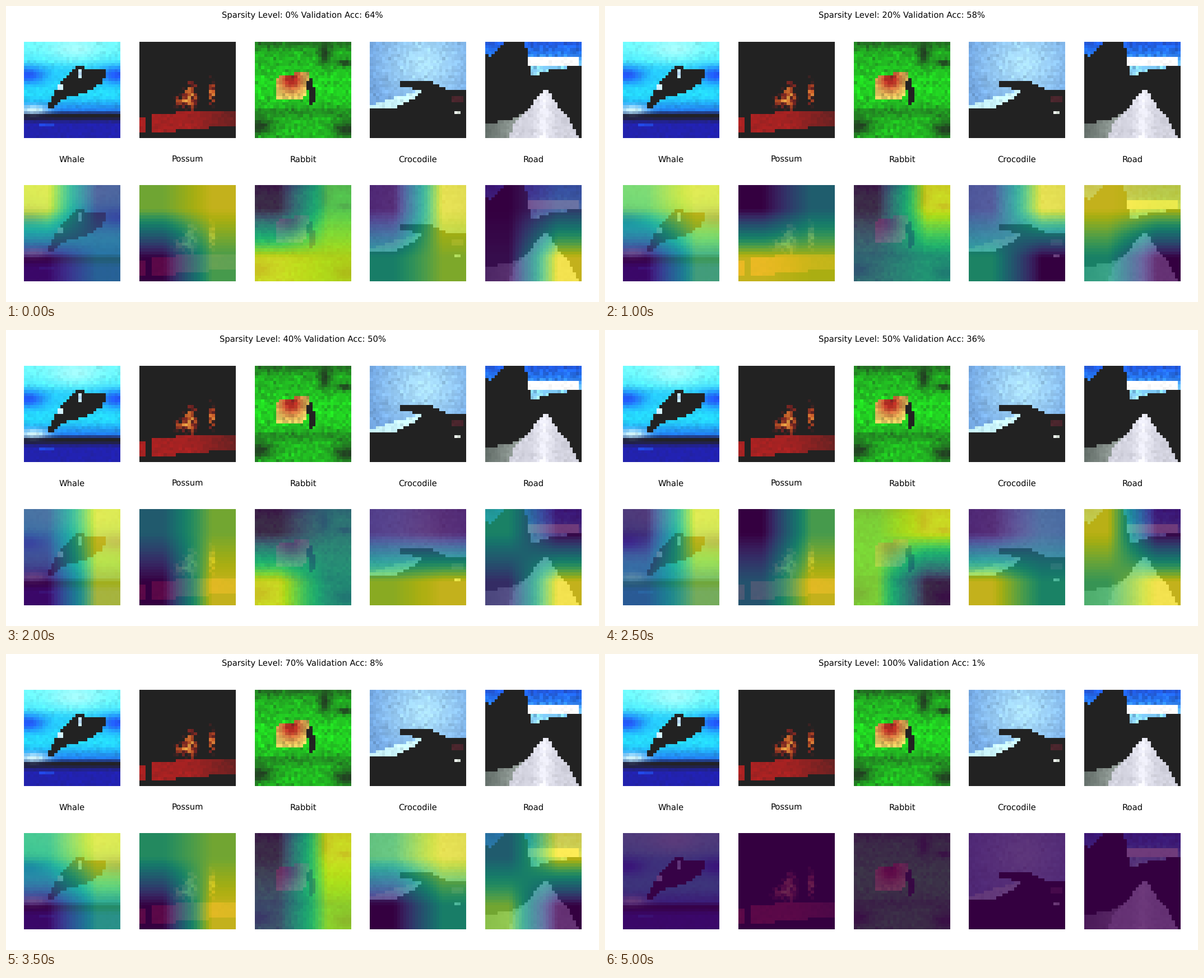
These frames come from a looping animation (1058x529 px, 5500 ms). A matplotlib script:

```python
import numpy as np
import matplotlib.pyplot as plt
from matplotlib.animation import FuncAnimation
from matplotlib.path import Path

W, H, DPI = 1058, 529, 100
N, SIDE = 32, 172
LEFTS = [32 + round(205.75 * i) for i in range(5)]
PHOTO_TOP, MAP_TOP = 64, 320
BLACK = (0, 0, 0)

plt.rcParams["font.family"] = "DejaVu Sans"
plt.rcParams["text.hinting"] = "no_hinting"

YY, XX = np.mgrid[:N, :N] + 0.5
CELLS = np.column_stack([XX.ravel(), YY.ravel()])


def ramp(field, at, *colors):
    """Map a scalar field to colours given at a few values."""
    return np.stack([np.interp(field, at, c) for c in zip(*colors)], axis=-1)


def poly(img, points, color):
    mask = Path(points).contains_points(CELLS).reshape(N, N)
    img[mask] = color[mask] if np.ndim(color) == 3 else color


def rect(img, x0, x1, y0, y1, color):
    img[y0:y1, x0:x1] = color


def bump(x, y, rx, ry):
    return np.exp(-((XX - x) / rx) ** 2 - ((YY - y) / ry) ** 2)


def glow(img, x, y, rx, ry, color):
    img += bump(x, y, rx, ry)[..., None] * (np.array(color) - img)


def grain(img, amount, seed):
    noise = np.random.default_rng(seed).normal(0, amount, (N, N, 1))
    return np.clip(img * (1 + noise), 0, 255)


def whale():
    img = ramp(YY, [2, 6, 9, 18, 23, 24, 25, 27],
               (110, 250, 255), (80, 240, 255), (40, 210, 255), (38, 220, 255),
               (30, 120, 240), (8, 8, 40), (8, 8, 40), (28, 28, 175))
    glow(img, 17, 2, 8, 4, (165, 255, 255))
    for x in (1, 31):
        glow(img, x, 11, 6, 2.8, (25, 85, 250))
    glow(img, 3, 22.5, 5, 1.5, (215, 250, 255))
    poly(img, [(17, 8), (22, 9), (27.3, 8.6), (26, 13.5), (20, 17), (12, 19),
               (9, 22), (8, 21.8), (10, 16.5), (13, 12.5)], (8, 8, 25))
    rect(img, 18, 19, 9, 12, (190, 225, 255))
    rect(img, 11, 13, 14, 16, (205, 235, 255))
    rect(img, 5, 10, 27, 28, (30, 70, 225))
    return grain(img, 0.03, 1)


def possum():
    rng = np.random.default_rng(4)
    flame = bump(17, 18, 2.6, 5) + bump(24, 16.5, 1.3, 5) + 0.7 * bump(13, 20, 3, 2)
    flame *= rng.uniform(0.35, 1, (N, N))
    img = ramp(flame, [0.2, 0.4, 0.65, 0.9],
               BLACK, (120, 38, 28), (195, 90, 40), (230, 165, 70))
    red = ramp(XX, [0, 18, 32], (170, 32, 32), (160, 32, 32), (105, 32, 32))
    poly(img, [(0, 24.7), (12, 23.5), (32, 23), (32, 27.6), (12, 29.5), (0, 30)], red)
    rect(img, 2, 4, 24, 31, BLACK)
    return grain(img, 0.04, 2)


def rabbit():
    img = ramp(YY, [0, 3, 15, 21, 23, 26],
               (24, 105, 24), (30, 170, 30), (32, 215, 32), (30, 190, 30),
               (26, 140, 26), (30, 185, 30))
    for x, y, rx, ry in [(23, 4, 2, 4), (30, 7, 3, 1.3), (1, 28, 5, 3), (31, 29, 5, 3)]:
        glow(img, x, y, rx, ry, (22, 60, 22))
    poly(img, [(17, 11), (18, 11), (20, 16), (20, 20), (18, 21)], (15, 35, 15))
    fur = ramp(np.hypot(XX - 12, YY - 12.5), [1.5, 3.5, 6],
               (180, 45, 35), (205, 125, 65), (225, 200, 95))
    poly(img, [(7, 12), (9, 10.6), (17.6, 10.4), (17.4, 16), (16, 19), (7, 19)], fur)
    return grain(img, 0.09, 3)


def crocodile():
    img = ramp(np.hypot(XX - 18, YY - 7), [2, 18],
               (175, 228, 255), (118, 170, 228))
    poly(img, [(0, 21), (10, 18), (17, 16), (15, 20), (8, 22), (0, 22)], (205, 248, 255))
    poly(img, [(10, 13), (20, 13.2), (26, 16), (32, 16), (32, 32), (0, 32),
               (0, 22), (8, 21.8), (16, 17.8), (16.6, 16.4), (10, 14.4)], BLACK)
    rect(img, 27, 31, 18, 20, (75, 38, 45))
    rect(img, 28, 30, 23, 24, (235, 245, 235))
    return grain(img, 0.04, 4)


def road():
    img = np.zeros((N, N, 3))
    sky = ramp(YY, [0, 4, 8, 12],
               (30, 90, 230), (40, 125, 250), (125, 205, 255), (165, 230, 255))
    sky = grain(sky, 0.1, 5)
    poly(img, [(13, 0), (32, 0), (32, 8), (22, 9), (15, 11.5), (14, 4)], sky)
    poly(img, [(0, 0), (7, 0), (5, 1.6), (2, 5), (0, 3)], sky)
    rect(img, 14, 31, 5, 8, (255, 255, 255))
    verge = ramp(XX, [0, 10], (98, 109, 104), (150, 160, 155))
    poly(img, [(0, 27), (8, 26), (12, 24), (12, 32), (0, 32)], verge)
    lane = ramp(np.abs(XX - 19.5), [0, 4], (245, 245, 255), (212, 212, 224))
    poly(img, [(19, 16), (20.6, 16), (24, 21), (27.6, 25), (31, 32), (8, 32),
               (9, 28), (14, 22.5)], lane)
    return grain(img, 0.025, 6)


PHOTOS = {"Whale": whale(), "Possum": possum(), "Rabbit": rabbit(),
          "Crocodile": crocodile(), "Road": road()}

ACCURACY = {0: 64, 20: 58, 40: 50, 60: 22, 70: 8, 90: 0, 100: 1}

# Per sparsity level and photo: direction of attention in degrees, saddle twist.
FOCUS = {
    0: [(119, -1.36), (50, -.41), (-59, .6), (-19, .53), (-35, -.51)],
    20: [(50, -.37), (-77, .29), (11, .65), (70, 2.36), (115, .37)],
    40: [(10, -.09), (9, -.37), (-101, .74), (-89, -.11), (-68, -2.33)],
    60: [(-35, .97), (-56, .48), (96, -.16), (-114, 2.03), (-155, -.43)],
    70: [(47, -.23), (22, -.63), (-1, .16), (55, -.23), (113, 2.43)],
    90: [(-71, -.42), (-35, 2.09), (-1, .85), (-38, .44), (-120, -1.3)],
}
CORNER_X = np.array([[-1, 1], [-1, 1]])
CORNER_Y = np.array([[1, 1], [-1, -1]])


def normalise(values):
    return (values - values.min()) / np.ptp(values)


def key_corners(level, index):
    angle, twist = FOCUS[level][index]
    a = np.radians(angle)
    return normalise(np.cos(a) * CORNER_X + np.sin(a) * CORNER_Y
                     + twist * CORNER_X * CORNER_Y)


def corners(level, index):
    if level == 100:
        return np.zeros((2, 2))
    before = max(k for k in FOCUS if k <= level)
    after = min(k for k in FOCUS if k >= level)
    return normalise(key_corners(before, index) + key_corners(after, index))


def overlay(photo, values):
    """Bilinear 2x2 heat map blended over the photo."""
    t = np.clip((np.arange(N) + 0.5) / 16 - 0.5, 0, 1)
    blend = np.column_stack([1 - t, t])
    color = plt.cm.viridis(blend @ values @ blend.T)[..., :3]
    return np.clip(0.77 * color + 0.23 * photo / 255, 0, 1)


def enlarge(img):
    cell = np.arange(SIDE) * N // SIDE
    return img[cell][:, cell]


fig = plt.figure(figsize=(W / DPI, H / DPI), dpi=DPI, facecolor="white")


def show(img, left, top):
    return fig.figimage(enlarge(img), xo=left, yo=H - top - SIDE, origin="upper")


def label(text, x, baseline):
    return fig.text(x / W, 1 - baseline / H, text, size=10.58, ha="center",
                    va="baseline", color="black")


heading = label("", W / 2, 21)
maps = []
for left, (name, photo) in zip(LEFTS, PHOTOS.items()):
    show(np.maximum(photo, 34) / 255, left, PHOTO_TOP)
    maps.append(show(np.zeros((N, N, 3)), left, MAP_TOP))
    label(name, left + SIDE / 2, 279)


def update(step):
    level = 10 * step
    accuracy = np.interp(level, list(ACCURACY), list(ACCURACY.values()))
    heading.set_text(f"Sparsity Level: {level}% Validation Acc: {accuracy:.0f}%")
    for i, photo in enumerate(PHOTOS.values()):
        maps[i].set_data(enlarge(overlay(photo, corners(level, i))))
    return [heading, *maps]


anim = FuncAnimation(fig, update, frames=11, interval=500,
                     repeat=True, repeat_delay=0, blit=False)
plt.show()
```
